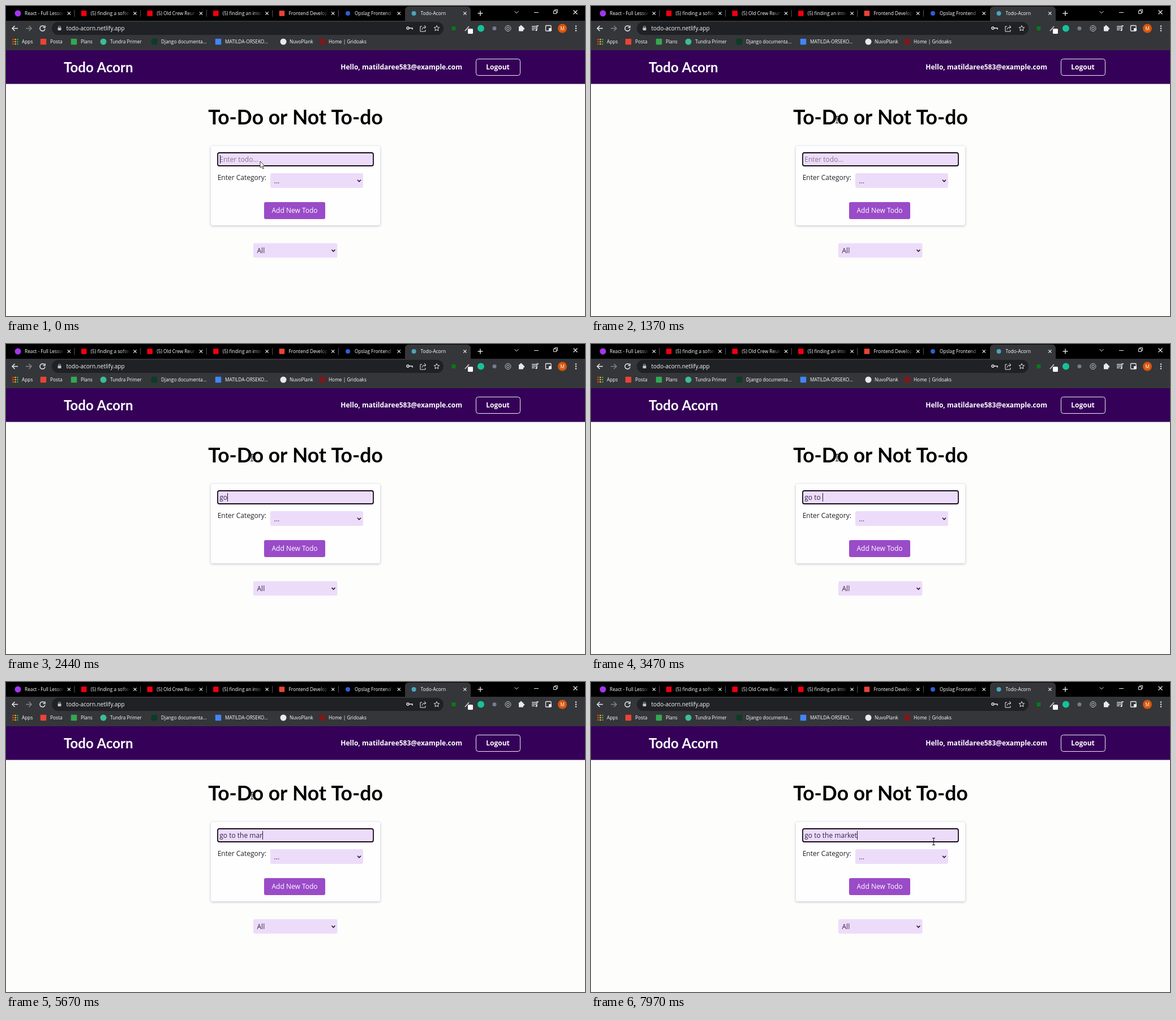
An HTML page with a canvas for the animation above (8000 ms loop, 1023 px wide and 547 px high).

```html
<!DOCTYPE html>
<html lang="en">
<head>
<meta charset="utf-8">
<title>Todo-Acorn</title>
<style>
html, body { margin: 0; width: 100%; height: 100%; overflow: hidden; background: #fdfdfc; }
canvas { display: block; width: 1023px; height: 547px; }
</style>
</head>
<body>
<canvas id="stage" width="1023" height="547"></canvas>
<script>
const ctx = document.getElementById('stage').getContext('2d');
const LOOP = 8000, BLINK = 530;
const SANS = '"Open Sans", "Noto Sans", sans-serif';
const LATO = 'Lato, "Open Sans", sans-serif';
const INK = '#34204a', LILAC = '#eddcf9', PALE = '#e8eaed';
const UI = 8.3, BODY = 12;

function box(x, y, w, h, r, fill, stroke, lw = 1) {
  ctx.beginPath();
  ctx.roundRect(x, y, w, h, r);
  if (fill) { ctx.fillStyle = fill; ctx.fill(); }
  if (stroke) { ctx.strokeStyle = stroke; ctx.lineWidth = lw; ctx.stroke(); }
}
function disc(x, y, r, fill, stroke, lw) { box(x - r, y - r, 2 * r, 2 * r, r, fill, stroke, lw); }
function square(x, y, s, fill) { box(x - s / 2, y - s / 2, s, s, 1, fill); }
function line(pts, color, lw = 1.2) {
  ctx.beginPath();
  for (let i = 0; i < pts.length; i += 2) ctx.lineTo(pts[i], pts[i + 1]);
  ctx.strokeStyle = color;
  ctx.lineWidth = lw;
  ctx.stroke();
}
function text(s, x, y, size, color, { weight = 400, align = 'left', family = SANS } = {}) {
  ctx.font = `${weight} ${size}px ${family}`;
  ctx.textAlign = align;
  ctx.fillStyle = color;
  ctx.fillText(s, x, y);
}
function cross(x, y, r, color) {
  line([x - r, y - r, x + r, y + r], color);
  line([x - r, y + r, x + r, y - r], color);
}
function chevron(x, y, r, color, lw) { line([x - r, y - r / 2, x, y + r / 2, x + r, y - r / 2], color, lw); }

const tabs = [
  ['React - Full Lessons', 'disc', '#a435f0'],
  ['(5) finding a softer job', 'square', '#f00010'],
  ['(5) Old Crew Reunites', 'square', '#f00010'],
  ['(5) finding an interest', 'square', '#f00010'],
  ['Frontend Developer', 'square', '#ea4335'],
  ['Opslag Frontend', 'disc', '#2d5fd0'],
  ['Todo-Acorn', 'disc', '#4aa5bd']
];

function drawTabs() {
  ctx.fillStyle = '#000';
  ctx.fillRect(0, 0, 1023, 26);
  box(705, 1, 116, 27, [6, 6, 0, 0], '#35363a');
  tabs.forEach(([title, shape, color], i) => {
    const x = 21 + i * 116.6;
    if (shape === 'disc') disc(x, 13, i < 5 ? 5.5 : 4, color);
    else square(x, 13, 9.5, color);
    ctx.save();
    ctx.beginPath();
    ctx.rect(x + 12, 0, 70, 26);
    ctx.clip();
    const fade = ctx.createLinearGradient(x + 66, 0, x + 82, 0);
    fade.addColorStop(0, '#fff');
    fade.addColorStop(1, 'rgba(255,255,255,0)');
    text(title, x + 12, 16, UI, fade);
    ctx.restore();
    cross(x + 90.3, 13, 2.6, PALE);
    if (i < 5) line([x + 100, 7, x + 100, 19], '#55565a', 1);
  });
  line([838, 8.5, 838, 17.5], PALE, 1.4);
  line([833.5, 13, 842.5, 13], PALE, 1.4);
  chevron(902, 11, 3.5, PALE, 1);
  line([933, 11.5, 941, 11.5], PALE, 1);
  box(967.5, 8.5, 5, 5, 0, null, PALE);
  line([969.5, 8, 969.5, 6.5, 974.5, 6.5, 974.5, 11.5, 973, 11.5], PALE, 1);
  cross(1006, 11, 3.5, PALE);
}

function drawArrow(x, dir, color) {
  line([x - 5 * dir, 39.5, x + 5 * dir, 39.5], color, 1.5);
  line([x + 0.5 * dir, 35, x + 5 * dir, 39.5, x + 0.5 * dir, 44], color, 1.5);
}

function drawToolbar() {
  ctx.fillStyle = '#35363a';
  ctx.fillRect(0, 26, 1023, 52);
  drawArrow(16, -1, PALE);
  drawArrow(40, 1, '#85868a');
  ctx.beginPath();
  ctx.arc(64.5, 39.5, 4.5, 0.2, 5.5);
  ctx.strokeStyle = PALE;
  ctx.lineWidth = 1.5;
  ctx.stroke();
  line([69, 34.5, 69, 38, 65.5, 38], PALE, 1.5);

  box(81, 28, 692, 23, 11.5, '#202124');
  box(91.5, 38, 6, 5, 1, '#bdc1c6');
  ctx.beginPath();
  ctx.arc(94.5, 37.5, 2, Math.PI, 0);
  ctx.strokeStyle = '#bdc1c6';
  ctx.lineWidth = 1;
  ctx.stroke();
  text('todo-acorn.netlify.app', 106.5, 43, 10, '#f8f9fa');

  disc(710, 39, 2, null, PALE, 1.4);
  line([712, 39, 718, 39, 718, 41.5], PALE, 1.5);
  line([735, 36, 732, 36, 732, 45, 741, 45, 741, 42], PALE, 1);
  line([735, 41.5, 737, 38, 742, 37], PALE, 1);
  line([739, 34, 742, 37, 739, 40], PALE, 1);
  ctx.beginPath();
  for (let i = 0; i < 10; i++) {
    const a = i * Math.PI / 5 - Math.PI / 2, r = i % 2 ? 2.3 : 5;
    ctx.lineTo(761 + r * Math.cos(a), 39.5 + r * Math.sin(a));
  }
  ctx.closePath();
  ctx.strokeStyle = PALE;
  ctx.lineWidth = 1;
  ctx.stroke();

  square(791, 39.5, 7, '#087a16');
  line([811, 44, 818, 36], '#c4c7ca', 1.8);
  box(816, 40, 9, 9, 1.5, '#fff');
  disc(839, 39.5, 6, '#15c39a');
  disc(863, 39.5, 3.5, '#777b8b');
  disc(887, 39.5, 5, null, '#c4c7ca');
  disc(887, 39.5, 2.3, null, '#c4c7ca');
  box(906, 36, 8, 8.5, 1, PALE);
  disc(910, 35.5, 1.7, PALE);
  disc(914.5, 40, 1.7, PALE);
  for (let i = 0; i < 3; i++) line([929, 36 + i * 3, i < 2 ? 937 : 934, 36 + i * 3], PALE, 1.4);
  line([941, 35, 938, 35, 938, 42], PALE, 1.4);
  disc(937, 42.5, 1.6, PALE);
  box(953.5, 34.5, 9.5, 9.5, 1, null, PALE, 1.3);
  box(959, 39, 5, 5, 0, PALE);
  disc(983, 39.5, 8, '#d9550b');
  text('M', 983, 42.5, 8.5, '#fff', { align: 'center' });
  for (let i = -1; i < 2; i++) disc(1007, 39.5 + i * 4, 1.2, PALE);
}

const marks = [
  ['Posta', 66, 78, 'square', '#ea4335'],
  ['Plans', 120, 132, 'square', '#34a853'],
  ['Tundra Primer', 172, 184, 'disc', '#3bbf8f'],
  ['Django documenta...', 262, 274, 'square', '#0c3c26'],
  ['MATILDA-ORSEKO...', 375, 387, 'square', '#4285f4'],
  ['NuvoPlank', 490, 501, 'disc', '#e8eaed'],
  ['Home | Gridoaks', 559, 570, 'square', '#7a1a1c']
];

function drawBookmarks() {
  const dots = ['#ea4335', '#fbbc04', '#34a853', '#4285f4'];
  for (let i = 0; i < 9; i++)
    square(12.5 + i % 3 * 4, 59 + Math.floor(i / 3) * 4, 2.6, dots[(i + Math.floor(i / 3)) % 4]);
  text('Apps', 28, 66, UI, '#fff');
  for (const [name, ix, tx, shape, color] of marks) {
    if (shape === 'disc') disc(ix, 63, 5.5, color);
    else square(ix, 63, 10.5, color);
    text(name, tx, 66, UI, '#fff');
  }
}

function drawSelect(x, y, w, h, label) {
  box(x, y, w, h, 3, LILAC);
  text(label, x + 6.5, y + 17.5, BODY, INK);
  chevron(x + w - 7, y + h / 2 + 0.3, 3, '#25132f', 1.6);
}

function drawPage() {
  ctx.fillStyle = '#fdfdfc';
  ctx.fillRect(0, 78, 1023, 469);
  ctx.fillStyle = '#350058';
  ctx.fillRect(0, 78, 1023, 59.5);
  text('Todo Acorn', 102, 117, 24, '#fff', { weight: 700, family: LATO });
  text('Hello, matildaree583@example.com', 806, 112, BODY, '#fff', { weight: 700, align: 'right' });
  box(830.5, 93.5, 78, 29, 4, null, '#f4eef8');
  text('Logout', 869, 112, BODY, '#fff', { weight: 700, align: 'center' });
  text('To-Do or Not To-do', 511.5, 209, 35.5, '#000', { weight: 700, align: 'center', family: LATO });

  ctx.save();
  ctx.shadowColor = 'rgba(50,30,80,.3)';
  ctx.shadowBlur = 4;
  ctx.shadowOffsetY = 1;
  box(362, 247, 299, 140, 3, '#fefefe');
  ctx.restore();
  text('Enter Category:', 373.7, 307, BODY, '#25222a');
  drawSelect(467, 295, 164, 26, '...');
  box(456, 346, 108, 30, 3, '#9a4bc8');
  text('Add New Todo', 510, 365, BODY, '#fff', { align: 'center' });
  drawSelect(437, 418.5, 148.5, 25.5, 'All');
}

const todo = 'go to the market';
const keys = [1980, 2250, 2750, 2950, 3150, 3400, 3640, 3800, 3950, 4170,
              5000, 5180, 5380, 5750, 6000, 6500];

function drawInput(t) {
  box(374, 259, 275, 23, 3, LILAC, '#130c1c', 1.8);
  const count = keys.filter(k => k <= t).length;
  const typed = todo.slice(0, count);
  text(typed || 'Enter todo...', 377.3, 275, BODY, typed ? INK : '#85788f');
  // The caret restarts its blink with every key.
  const since = count ? t - keys[count - 1] : t + BLINK - 50;
  if (Math.floor(since / BLINK) % 2) return;
  const x = 378 + (typed ? ctx.measureText(typed).width : 0);
  ctx.fillStyle = '#241433';
  ctx.fillRect(Math.floor(x), 263, 1, 15);
}

const path = [
  [30, 449, 274], [130, 434, 200], [7170, 434, 200], [7330, 338, 226],
  [7560, 430, 262], [7800, 622, 272], [7940, 605, 281]
];

function pointerAt(t) {
  if (t <= path[0][0]) return path[0].slice(1);
  for (let i = 1; i < path.length; i++) {
    const [t0, x0, y0] = path[i - 1], [t1, x1, y1] = path[i];
    if (t < t1) {
      const p = (t - t0) / (t1 - t0), e = p * p * (3 - 2 * p);
      return [x0 + (x1 - x0) * e, y0 + (y1 - y0) * e];
    }
  }
  return path[path.length - 1].slice(1);
}

function drawPointer(t) {
  const [x, y] = pointerAt(t).map(Math.round);
  const onTitle = x > 358 && x < 665 && y > 180 && y < 214;
  const onInput = t > 130 && x > 374 && x < 649 && y > 259 && y < 283;
  if (onTitle || onInput) {
    line([x + 0.5, y - 5, x + 0.5, y + 6], '#111', 1);
    line([x - 2, y - 5.5, x + 3, y - 5.5], '#111', 1);
    line([x - 2, y + 6.5, x + 3, y + 6.5], '#111', 1);
    return;
  }
  ctx.beginPath();
  [[0, 0], [0, 11.5], [2.7, 9], [4.6, 13.3], [6.5, 12.5], [4.6, 8.3], [8.2, 8.3]]
    .forEach(([dx, dy]) => ctx.lineTo(x + dx, y + dy));
  ctx.closePath();
  ctx.fillStyle = '#fff';
  ctx.fill();
  ctx.strokeStyle = '#222';
  ctx.lineWidth = 0.9;
  ctx.stroke();
}

function render(t) {
  drawTabs();
  drawToolbar();
  drawBookmarks();
  drawPage();
  drawInput(t);
  drawPointer(t);
}

const start = performance.now();
function tick() {
  render((performance.now() - start) % LOOP);
  requestAnimationFrame(tick);
}
tick();
</script>
</body>
</html>
```
